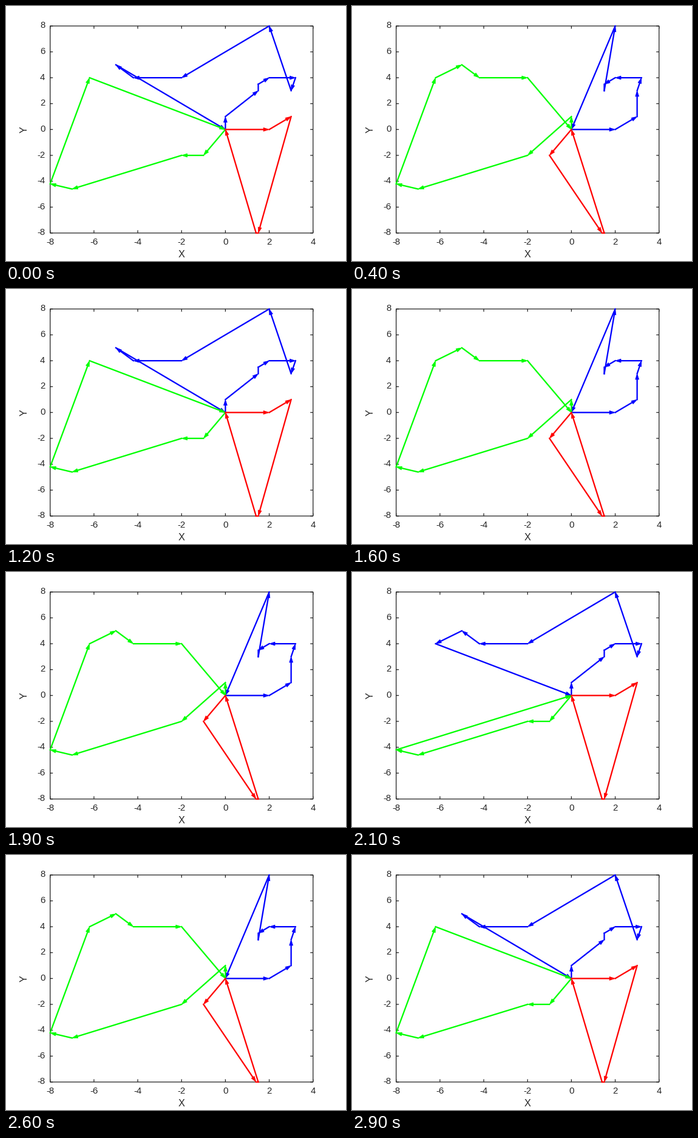
These frames come from a looping animation (560x420 px, 3 s). A matplotlib script:

```python
import numpy as np
import matplotlib.pyplot as plt
from matplotlib.animation import FuncAnimation
from matplotlib.patches import Rectangle

W, H, DPI = 560, 420, 100
LEFT, RIGHT, TOP, BOTTOM = 72.7, 505.7, 32.9, 373.9
INK = "#262626"
PX = 72 / DPI  # points per pixel
FRAME_W, LINE_W = 1.3 * PX, 2.3 * PX

plt.rcParams["font.family"] = "Liberation Sans"
fig = plt.figure(figsize=(W / DPI, H / DPI), dpi=DPI, facecolor="white")
ax = fig.add_axes([0, 0, 1, 1])
ax.set_xlim(0, W)
ax.set_ylim(H, 0)
ax.axis("off")


def to_px(x, y):
    """Data coordinates to stage pixels."""
    return np.array([LEFT + (x + 8) / 12 * (RIGHT - LEFT),
                     TOP + (8 - y) / 16 * (BOTTOM - TOP)])


def tick(x0, y0, dx, dy):
    ax.plot([x0, x0 + dx], [y0, y0 + dy], color=INK, lw=FRAME_W,
            solid_capstyle="butt", snap=False, zorder=2)


def label(x, y, text, size, **kw):
    ax.text(x, y, text, fontsize=size * PX, color=INK, **kw)


def draw_axes():
    ax.add_patch(Rectangle((LEFT, TOP), RIGHT - LEFT, BOTTOM - TOP, fill=False,
                           ec=INK, lw=FRAME_W, snap=False, zorder=2))
    for v in range(-8, 5, 2):
        x = to_px(v, 0)[0]
        tick(x, BOTTOM, 0, -4.5)
        tick(x, TOP, 0, 4.5)
        label(x, 392.7, str(v), 15, ha="center", va="baseline")
    for v in range(-8, 9, 2):
        y = to_px(0, v)[1]
        tick(LEFT, y, 4.5, 0)
        tick(RIGHT, y, -4.5, 0)
        label(64.5, y + 3.5, str(v), 15, ha="right", va="baseline")
    label(288.8, 414, "X", 16.3, ha="center", va="baseline")
    label(30, 203.5, "Y", 16.3, ha="center", va="center", rotation=90)


def arrow(p, q, color, z):
    """Line from p to q; very short steps carry no head."""
    d = q - p
    size = np.hypot(*d)
    u = d / size
    n = np.array([-u[1], u[0]])
    has_head = size > 12
    end = q - 4 * u if has_head else q
    parts = ax.plot(*zip(p, end), color=color, lw=LINE_W, snap=False,
                    solid_capstyle="projecting", zorder=z)
    if has_head:
        base = q - 9.5 * u
        parts += ax.fill(*zip(q, base + 3 * n, base - 3 * n), color=color,
                         lw=0.6 * PX, snap=False, zorder=z)
    return parts


def tour(color, stops, z):
    """Closed trip from the origin through the stops and back."""
    pts = [to_px(*s) for s in [(0, 0), *stops, (0, 0)]]
    return [a for p, q in zip(pts, pts[1:]) for a in arrow(p, q, color, z)]


def plan(blue, green, red):
    parts = tour("#0000ff", blue, 3) + tour("#00ff00", green, 4) + tour("#ff0000", red, 5)
    for a in parts:
        a.set_visible(False)
    return parts


east = [(2, 0), (3, 1)]
south = [(1.5, -8), (1.4, -8)]
near = [(-1, -2), (-2, -2)]
far = [(-7, -4.6), (-8, -4.2)]
rise = [(0, 1), (1.5, 3), (1.5, 3.5), (2, 4), (3.2, 4), (3, 3), (2, 8)]
ridge = [(-2, 4), (-4.2, 4), (-5, 5), (-6.2, 4)]

draw_axes()
plans = {
    "A": plan(rise + ridge[:3], near + far + ridge[3:], east + south),
    "B": plan(east + [(3, 3), (3.2, 4), (2, 4), (1.5, 3.5), (1.5, 3), (2, 8)],
              [(0, 1), (-2, -2)] + far + ridge[::-1],
              [(-1, -2)] + south[::-1]),
    "C": plan(rise + ridge + far[::-1], near, east + south),
    "D": plan(rise + ridge, near + far, east + south),
}

# One letter per 100 ms
TIMELINE = "AAAABCAACCCBAAAABCDBADDBDDBCBA"


def update(i):
    for key, parts in plans.items():
        for a in parts:
            a.set_visible(key == TIMELINE[i])
    return []


anim = FuncAnimation(fig, update, frames=len(TIMELINE), interval=100,
                     repeat=True, repeat_delay=0, blit=False)
plt.show()
```
